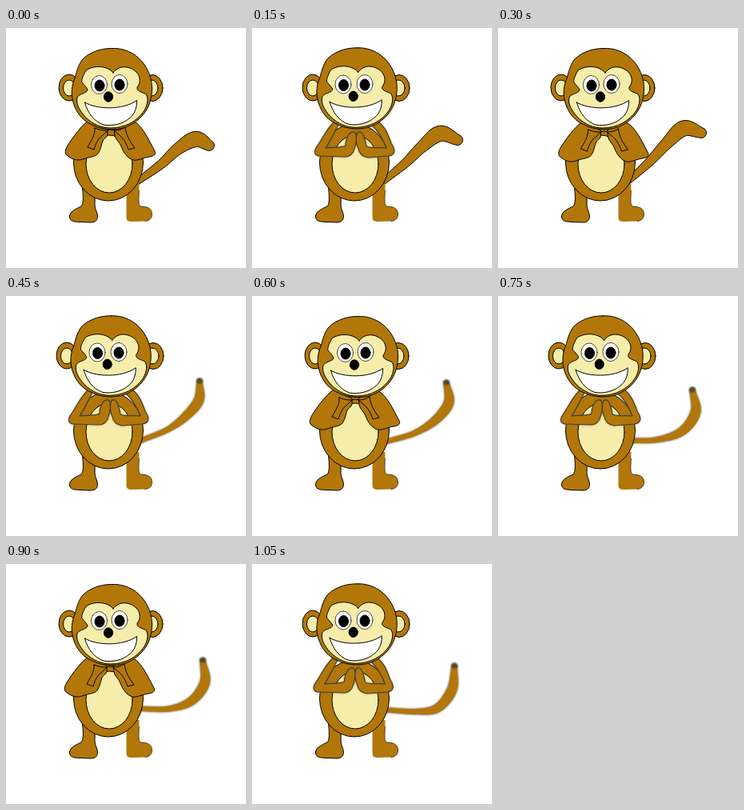
Recreate the animation shown at these times as an HTML page. Size 300 by 300 pixels, loop 1.2 s.

```html
<!DOCTYPE html>
<html lang="en">
<head>
<meta charset="utf-8">
<title>Clapping monkey</title>
<style>
  html, body { margin: 0; width: 100%; height: 100%; overflow: hidden; background: #fff; }
  svg { display: block; width: 100vw; height: 100vh; }
  .fur { fill: #b27708; }
  .skin { fill: #f6edaa; }
  .line { stroke: #000; stroke-width: 1; stroke-linejoin: round; stroke-linecap: round; }
  .soft { stroke: #493d25; stroke-width: 1.2; stroke-linejoin: round; }
  .bare { fill: none; }
</style>
</head>
<body>
<svg viewBox="0 0 300 300">
  <defs>
    <filter id="blur" x="-50%" y="-50%" width="200%" height="200%"><feGaussianBlur stdDeviation=".9"/></filter>
  </defs>

  <path id="tailShade" fill="#777" stroke="#777" filter="url(#blur)"/>
  <path id="tail" class="fur"/>
  <ellipse id="tip" rx="4" ry="3.6" fill="#443c2c" opacity=".85" filter="url(#blur)"/>

  <g class="fur line">
    <path d="M95 195C97 211 97 220 94 223C87 226 79 230 79.5 236C80 242 85 242 92 242.5L106 243C112 243 114.500 240 114.500 235C114 229 111 227 111 221L111.500 195Z"/>
    <path stroke="none" d="M150.500 195V237C150.500 241 153 242 158 242L174 241.500C180 241 183 237 182.500 232C182 225 176 223 169 223C165 222 166 216 166.500 195Z"/>
    <path class="bare" d="M166.500 203C166 216 165 222 169 223C176 223 182 225 182.500 232C183 237 180 241 174 241.500" stroke-width=".6"/>
    <ellipse cx="128" cy="168" rx="43.500" ry="48"/>
    <ellipse class="skin" cx="129" cy="170" rx="29" ry="36"/>
  </g>

  <g id="apart" class="fur line">
    <path d="M104 115C94 122 84 136 77 147C73 154 73 158 79 161C84 165 90 166 96 164C104 161 112 161 115 157C119 151 119 146 121 141C123 137 127 137 127 132L127 126L112 119Z"/>
    <path d="M156 115C165 118 170 125 177 137L186 154C188 158 185 160 179 161C172 162 165 166 159 165C152 163 147 156 144 148C142 142 137 140 136 134L135 126L148 119Z"/>
    <path d="M111 125C112 134 106 141 102 149L110 152C112 145 114 139 121 134L127 128"/>
    <path d="M149 124C150 134 155 142 161 150L153 152C151 146 148 139 142 134L135 128"/>
    <path class="bare" d="M111 125Q123 130 131 127Q140 130 149 124"/>
  </g>

  <g id="together">
    <g fill="none" stroke="#666" filter="url(#blur)"><use href="#armL"/><use href="#armR"/></g>
    <g class="fur soft">
      <path id="armL" d="M103 117C93 126 88 139 80 150C77 156 79 160 85 160L116 161C123 161 127 156 128 151C130 145 131 138 130 133C129 129 125 129 122 132C118 137 117 141 117 147C112 150 103 149 92 150C97 143 102 132 108 121Z"/>
      <path id="armR" d="M156 116C166 122 170 133 174 144C180 153 179 159 170 160L145 162C138 161 134 157 133 151C130 145 130 138 131 133C132 129 136 129 138 132C141 137 142 142 143 148C150 151 158 149 168 150C164 139 158 129 149 121Z"/>
    </g>
  </g>

  <g class="line">
    <g id="earL"><ellipse class="fur" cx="79" cy="74.500" rx="13" ry="16.500"/><ellipse class="skin" cx="79" cy="75" rx="7.500" ry="10"/></g>
    <g id="earR"><ellipse class="fur" cx="183" cy="75" rx="13" ry="16.500"/><ellipse class="skin" cx="182" cy="75" rx="8" ry="10"/></g>
    <g id="head">
      <path class="fur" d="M133 25.500C115 25 101 33 95 40C90 47 88 56 86 63C82 72 81 82 84 93C88 107 97 117 108 121C120 128 143 129 156 121C171 113 182 98 182.500 77C183 61 175 43 160 33C152 28 143 25 133 25.500Z"/>
      <path class="skin" d="M134 56C127 47 110 46 100 53C96 60 94 65 95 68C97 71 102 75 102 78C100 82 91 82 89 87C87 95 92 103 99 111C109 121 120 125 131 125C148 125 164 117 173 103C177 96 179 86 174 82C168 80 163 78 164 74C168 69 169 62 163 55C153 46 140 47 134 56Z"/>
      <path fill="#fff" d="M98.500 93C113 102 146 103 163.500 90.500C164 100 160 109 154 113C146 120 133 123 122 121C110 117 102 106 98.500 93Z"/>
      <ellipse cx="128" cy="86" rx="5.600" ry="6.200"/>
    </g>
    <g id="eyeL"><ellipse fill="#fff" stroke-width=".7" cx="116.500" cy="71" rx="10" ry="11.500"/><ellipse cx="117" cy="72" rx="6" ry="7"/></g>
    <g id="eyeR"><ellipse fill="#fff" stroke-width=".7" cx="142" cy="70" rx="10" ry="11.500"/><ellipse cx="142" cy="71" rx="6" ry="7"/></g>
  </g>
</svg>

<script>
const STEP = 150;
const $ = id => document.getElementById(id);

// Tail spine from rump to tip, one per pose, with the sideways and downward shift of the arms.
const poses = [
  { spine: [160,195, 193,171, 215,151, 237,139, 254,147], arms: [0, 0] },
  { spine: [160,195, 191,169.5, 213,148, 235,132, 257,140], arms: [0, 0] },
  { spine: [160,194, 189,167.5, 211,144, 232,125.5, 254,131], arms: [1.5, 2] },
  { spine: [168,181, 202,167, 225,150, 241,130, 242,107], arms: [0, 0] },
  { spine: [168,182, 203,171.5, 230,154.5, 246,133, 243,109], arms: [-2, 2] },
  { spine: [168,181, 200,179.5, 230,169, 247,145, 243,118], arms: [0, 0] },
  { spine: [168,181, 204,181, 232,171, 248.5,148, 246,121], arms: [-1, 1] },
  { spine: [168,182.5, 206,184.5, 232,180, 250,157, 253,128], arms: [-1.5, 0] }
];
const thick = [3.5, 5.5, 7.2, 9.7, 6.5];
const thin = [3, 3.5, 5.5, 6.3, 3.5];

function spline(v, t) {
  const last = v.length - 1, i = Math.min(Math.floor(t), last - 1), f = t - i;
  const b = v[i], c = v[i + 1];
  const a = i ? v[i - 1] : 2 * b - c;
  const d = i + 2 <= last ? v[i + 2] : 2 * c - b;
  return b + f * (c - a + f * (2 * a - 5 * b + 4 * c - d + f * (3 * (b - c) + d - a))) / 2;
}

function tailPath(spine, widths) {
  const xs = spine.filter((_, i) => i % 2 === 0);
  const ys = spine.filter((_, i) => i % 2);
  const near = [], far = [], n = 40, end = xs.length - 1;
  for (let k = 0; k <= n; k++) {
    const t = end * k / n, t0 = Math.max(0, t - .02), t1 = Math.min(end, t + .02);
    const dx = spline(xs, t1) - spline(xs, t0), dy = spline(ys, t1) - spline(ys, t0);
    const s = spline(widths, t) / Math.hypot(dx, dy), x = spline(xs, t), y = spline(ys, t);
    near.push((x + dy * s).toFixed(2) + " " + (y - dx * s).toFixed(2));
    far.unshift((x - dy * s).toFixed(2) + " " + (y + dx * s).toFixed(2));
  }
  const r = widths[end];
  return `M${near.join("L")}A${r} ${r} 0 0 1 ${far.join("L")}Z`;
}

const move = (id, x, y) => $(id).setAttribute("transform", `translate(${x} ${y})`);
const show = (id, on) => $(id).setAttribute("display", on ? "inline" : "none");

function draw(index) {
  const { spine, arms } = poses[index];
  const raised = index % 2, fuzzy = index > 2;
  const d = tailPath(spine, fuzzy ? thin : thick);

  $("tail").setAttribute("d", d);
  $("tail").setAttribute("class", fuzzy ? "fur" : "fur line");
  $("tailShade").setAttribute("d", d);
  show("tailShade", fuzzy);
  show("tip", fuzzy);
  move("tip", spine[8], spine[9] - 1);

  show("apart", !raised);
  show("together", raised);
  move(raised ? "together" : "apart", ...arms);

  move("head", raised ? -1.3 : 0, raised ? -.7 : 0);
  move("earL", raised ? -3 : 0, 0);
  move("earR", raised ? 1 : 0, 0);
  move("eyeL", raised ? -2.5 : 0, raised ? -.5 : 0);
  move("eyeR", raised ? -1 : 0, 0);
}

let shown = -1;
const start = performance.now();
function tick() {
  const index = Math.floor((performance.now() - start) / STEP) % poses.length;
  if (index !== shown) draw(shown = index);
  requestAnimationFrame(tick);
}
tick();
</script>
</body>
</html>
```
